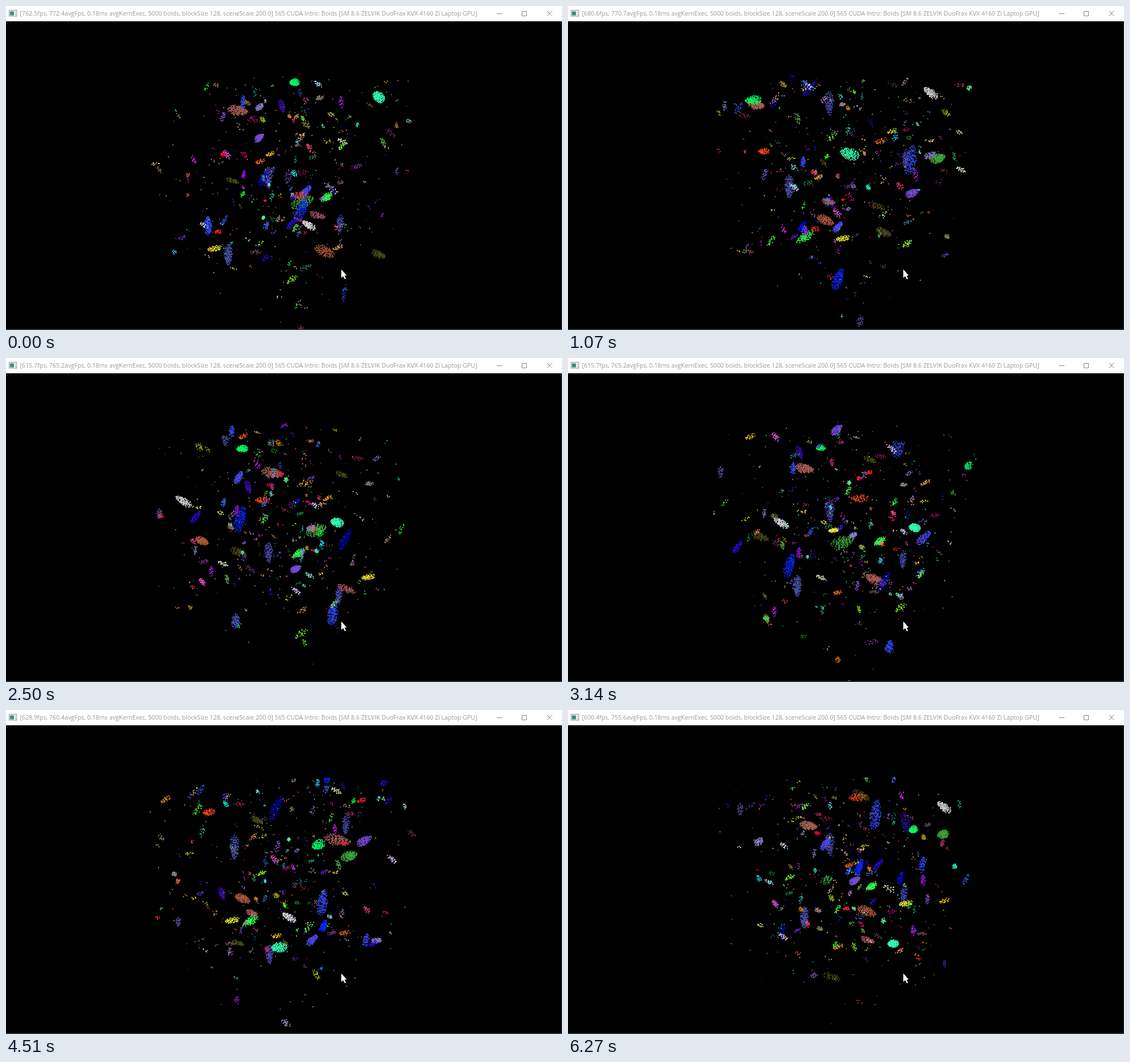
An HTML page with a canvas that plays this animation: 980 px wide and 572 px high, repeating every 6290 ms.

```html
<!DOCTYPE html>
<html lang="en">
<head>
<meta charset="utf-8">
<title>Boids</title>
<style>
  html, body { margin: 0; width: 100%; height: 100%; overflow: hidden; background: #000; }
  canvas, svg { position: absolute; left: 0; top: 0; }
  text { font: 10.7px "Open Sans", "Noto Sans", sans-serif; fill: #999; white-space: pre; }
</style>
</head>
<body>
<canvas id="sky" width="980" height="572"></canvas>
<svg width="980" height="572" viewBox="0 0 980 572">
  <rect width="980" height="27" fill="#fff"/>
  <rect y="570.5" width="980" height="1.5" fill="#3a3a3a"/>
  <rect x="979" y="27" width="1" height="545" fill="#333"/>
  <rect x="5.5" y="7.5" width="13.5" height="10.5" fill="#f4f4f4" stroke="#8a9494"/>
  <rect x="7" y="9.5" width="7" height="7" fill="#3d8f80"/>
  <path d="M16.5 10v2M16.5 14v2" stroke="#8a9494"/>
  <text id="title" x="24.5" y="17"></text>
  <path d="M865 13.5h10M909.5 9.5h8v8h-8zM953.5 8.5l9 9M962.5 8.5l-9 9" fill="none" stroke="#858585"/>
  <path d="M591 465v15l3.3-3 2.7 5.3 2.2-1-2.5-5.3h3.9z" fill="#fff"/>
</svg>
<script>
const LOOP = 6290, ANCHOR = 2.5, SPEED = 0.7;
const CENTER_X = 490, CENTER_Y = 299.5, FOCAL = 658, DISTANCE = 4, DOT = 1.7;

// Camera axes in the space of the 2 x 2 x 2 cube the boids live in
const RIGHT = [0.765, 0.644, 0];
const UP = [-0.2215, 0.263, -0.939];
const AWAY = [-0.605, 0.718, 0.344];

// Largest flocks first: screen x, y, depth at the anchor time, then velocity
const LEADERS = [
  [583, 290, 3.75, -.1, .9, .4],
  [470, 203, 3.4, -.99, .1, .05],
  [548, 304, 3.1, -.05, -.97, -.05],
  [576, 450, 3.45, -.1, 0, 1],
  [412, 285, 3.05, -.25, -.15, .95],
  [346, 323, 4.25, -1, .05, -.05],
  [405, 470, 4, 0, .05, -1],
  [511, 372, 4.9, -.78, 0, .55],
  [416, 160, 4.45, -.3, .95, .1],
  [463, 344, 3.85, 0, 0, -1],
  [516, 345, 4.25, -.1, .97, 0],
  [313, 253, 4.05, .58, .58, .58],
  [410, 211, 4.6, -.6, 0, .8],
  [410, 343, 3.7, -.6, -.6, -.4],
  [587, 420, 4.2, 0, 0, -1],
  [427, 228, 4.6, -.1, -.25, -.96],
  [599, 407, 3.7, -.98, .05, .1],
  [598, 320, 3.25, -.3, -.3, .9],
  [538, 300, 4.6, -.85, .2, .48],
  [452, 251, 3.4, .9, 0, -.2],
  [638, 387, 4.1, .68, .68, -.12],
  [398, 128, 4.35, -.1, 0, 1],
  [334, 281, 3.9, -.5, -.3, .8],
  [592, 206, 4.3, -.6, -.65, -.4]
];

const RATES = [
  "762.5fps, 772.4", "680.6fps, 770.7", "630.0fps, 768.0", "615.7fps, 765.2",
  "617.5fps, 762.5", "628.9fps, 760.4", "649.6fps, 758.4", "600.4fps, 755.6"
];

let seed = 20773;
function random() {
  seed = (seed + 0x6D2B79F5) | 0;
  let r = Math.imul(seed ^ (seed >>> 15), 1 | seed);
  r = (r + Math.imul(r ^ (r >>> 7), 61 | r)) ^ r;
  return ((r ^ (r >>> 14)) >>> 0) / 4294967296;
}
const spread = (size) => (random() * 2 - 1) * size;
const dot = (a, b) => a[0] * b[0] + a[1] * b[1] + a[2] * b[2];
const scale = (a, s) => a.map((c) => c * s);
const unit = (a) => scale(a, 1 / Math.hypot(...a));
const cross = (a, b) => [
  a[1] * b[2] - a[2] * b[1], a[2] * b[0] - a[0] * b[2], a[0] * b[1] - a[1] * b[0]
];
const wrap = (c) => c - 2 * Math.floor((c + 1) / 2);

function inBall() {
  let p;
  do p = [spread(1), spread(1), spread(1)]; while (dot(p, p) > 1);
  return p;
}

// Evenly spaced points: keep the candidate farthest from its neighbours
function fillBall(count) {
  const points = [];
  while (points.length < count) {
    let best, bestGap = -1;
    for (let i = 0; i < 6; i++) {
      const p = inBall();
      let gap = 9;
      for (const q of points) {
        gap = Math.min(gap, (p[0] - q[0]) ** 2 + (p[1] - q[1]) ** 2 + (p[2] - q[2]) ** 2);
      }
      if (gap > bestGap) { best = p; bestGap = gap; }
    }
    points.push(best);
  }
  return points;
}

function colorOf(velocity) {
  const channels = velocity.map((c) => Math.min(255, Math.round(Math.abs(c + 0.3 + spread(0.05)) * 255)));
  return `rgb(${channels})`;
}

function unproject([x, y, depth]) {
  const r = (x - CENTER_X) / FOCAL * depth;
  const u = (CENTER_Y - y) / FOCAL * depth;
  const a = depth - DISTANCE;
  return [0, 1, 2].map((i) => {
    const c = r * RIGHT[i] + u * UP[i] + a * AWAY[i];
    return Math.max(-0.97, Math.min(0.97, c));
  });
}

const boids = [];

function addFlock(center, velocity, count) {
  const along = unit(velocity);
  const side = unit(cross(along, Math.abs(along[2]) > 0.8 ? [1, 0, 0] : [0, 0, 1]));
  const other = cross(along, side);
  const size = Math.cbrt(count / 190);
  const length = 0.13 * size * (0.85 + 0.3 * random());
  const width = 0.047 * size;
  for (const [a, b, c] of fillBall(count)) {
    const thin = width * (1 + 0.25 * a);
    boids.push({
      start: center.map((p, i) => p + a * length * along[i] + thin * (b * side[i] + c * other[i])),
      velocity,
      color: colorOf(velocity)
    });
  }
}

const anywhere = () => [spread(1), spread(1), spread(1)];

LEADERS.forEach((row, i) => {
  addFlock(unproject(row), row.slice(3), Math.round(45 + 145 * (1 - i / LEADERS.length) ** 1.3));
});
for (let i = 0; i < 150; i++) {
  addFlock(anywhere(), unit(inBall()), 3 + Math.floor(30 * random() ** 2.4));
}
for (let i = 0; i < 200; i++) {
  addFlock(anywhere(), scale(unit(inBall()), 0.5 + 0.5 * random()), 1);
}

const pen = document.getElementById("sky").getContext("2d");
const title = document.getElementById("title");

function drawTitle(ms) {
  const index = ms < 450 ? 0 : 1 + Math.floor((ms - 450) / 930);
  const text = `[${RATES[index]}avgFps, 0.18ms avgKernExec, 5000 boids, blockSize 128, ` +
    "sceneScale 200.0] 565 CUDA Intro: Boids [SM 8.6 ZELVIK DuoFrax KVX 4160 Zi Laptop GPU]";
  if (title.textContent !== text) title.textContent = text;
}

function drawBoids(ms) {
  const travel = (ms / 1000 - ANCHOR) * SPEED;
  pen.fillStyle = "#000";
  pen.fillRect(0, 0, 980, 572);
  for (const { start, velocity, color } of boids) {
    const p = [0, 1, 2].map((i) => wrap(start[i] + velocity[i] * travel));
    const zoom = FOCAL / (DISTANCE + dot(AWAY, p));
    pen.fillStyle = color;
    pen.fillRect(
      CENTER_X + dot(RIGHT, p) * zoom - DOT / 2,
      CENTER_Y - dot(UP, p) * zoom - DOT / 2,
      DOT, DOT
    );
  }
}

function render() {
  const ms = performance.now() % LOOP;
  drawTitle(ms);
  drawBoids(ms);
  requestAnimationFrame(render);
}
render();
</script>
</body>
</html>
```
